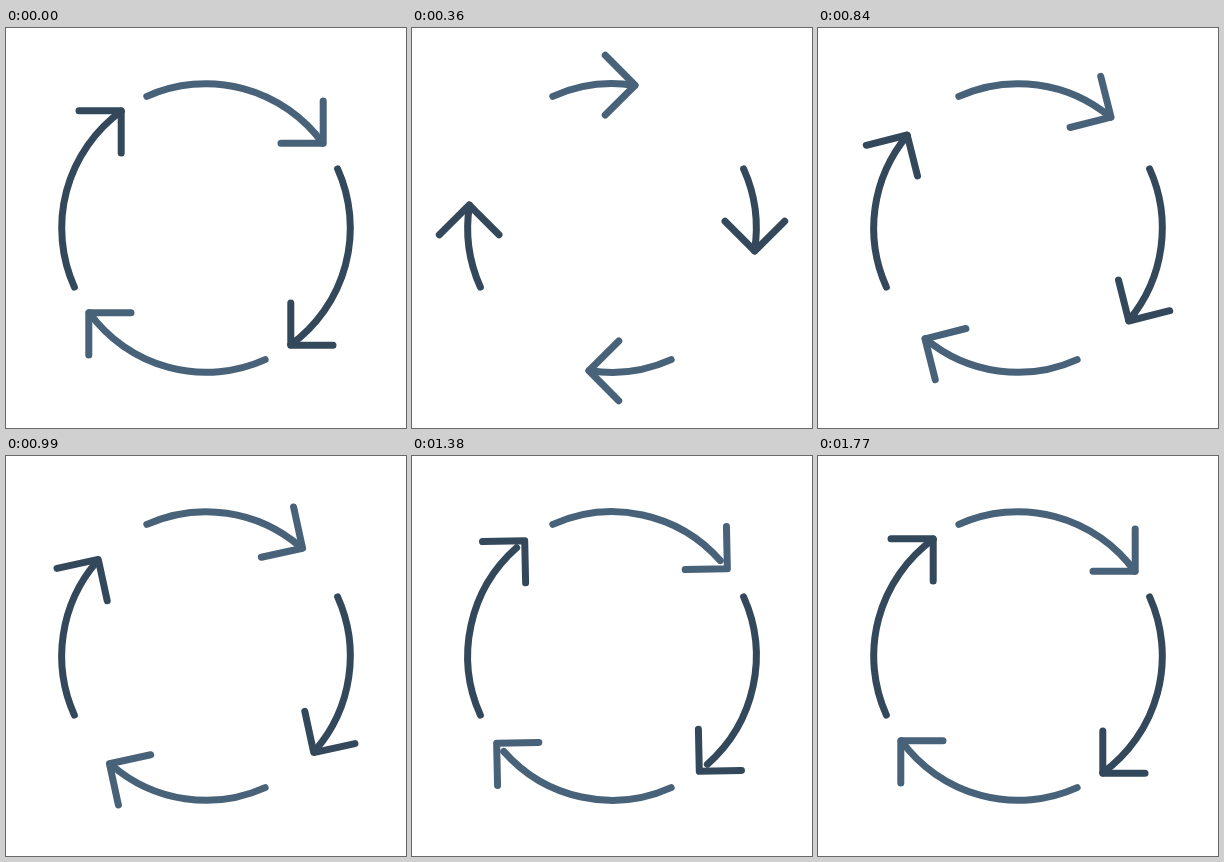
These frames come from a looping animation (400x400 px, 2.83 s). An HTML page:

```html
<!DOCTYPE html>
<html lang="en">
<head>
<meta charset="utf-8">
<title>Cycle arrows</title>
<style>
  html, body { margin: 0; width: 100%; height: 100%; overflow: hidden; background: #fff; }
  svg { display: block; width: 100%; height: 100%; }
  path { fill: none; stroke-width: 7; stroke-linecap: round; stroke-linejoin: round; }
</style>
</head>
<body>
<svg viewBox="0 0 400 400"></svg>
<script>
const LOOP = 2830, STEP = 30, MOTION_END = 1770;
const RADIUS = 144.3, ARC_START = -24.2, ARC_END = 54;
const LIGHT = '#486279', DARK = '#34485b';

// [time in ms, degrees away from the rest pose]
const PULL_BACK = [[0, 0], [502, -55.8], [840, -14.1]];
const HEAD_KEYS = [...PULL_BACK, [1500, 0]];
const ARC_KEYS = [...PULL_BACK, [MOTION_END, 0]];

const svg = document.querySelector('svg');

function add(parent, tag, attrs) {
  const el = document.createElementNS('http://www.w3.org/2000/svg', tag);
  for (const name in attrs) el.setAttribute(name, attrs[name]);
  return parent.appendChild(el);
}

// Degrees run clockwise from the top of the circle.
function pointAt(degrees) {
  const a = degrees * Math.PI / 180;
  return `${(200 + RADIUS * Math.sin(a)).toFixed(3)} ${(200 - RADIUS * Math.cos(a)).toFixed(3)}`;
}

function valueAt(keys, time) {
  const next = keys.findIndex(key => key[0] > time);
  if (next < 0) return keys[keys.length - 1][1];
  const [t0, v0] = keys[next - 1], [t1, v1] = keys[next];
  const u = (time - t0) / (t1 - t0);
  return v0 + (v1 - v0) * u * u * (3 - 2 * u);
}

const arrows = [0, 90, 180, 270].map((turn, i) => {
  const group = add(svg, 'g', {
    transform: `rotate(${turn} 200 200)`,
    stroke: i % 2 ? DARK : LIGHT
  });
  return {
    arc: add(group, 'path', {}),
    head: add(group, 'path', { d: 'M317.2 73V115.2H275' })
  };
});

function draw(now) {
  const time = Math.floor((now % LOOP) / STEP) * STEP;
  const arcPath = `M${pointAt(ARC_START)}A${RADIUS} ${RADIUS} 0 0 1 ${pointAt(ARC_END + valueAt(ARC_KEYS, time))}`;
  const headTurn = `rotate(${valueAt(HEAD_KEYS, time)} 200 200)`;
  for (const { arc, head } of arrows) {
    arc.setAttribute('d', arcPath);
    head.setAttribute('transform', headTurn);
  }
}

const start = performance.now();
function tick() {
  draw(performance.now() - start);
  requestAnimationFrame(tick);
}
tick();
</script>
</body>
</html>
```
